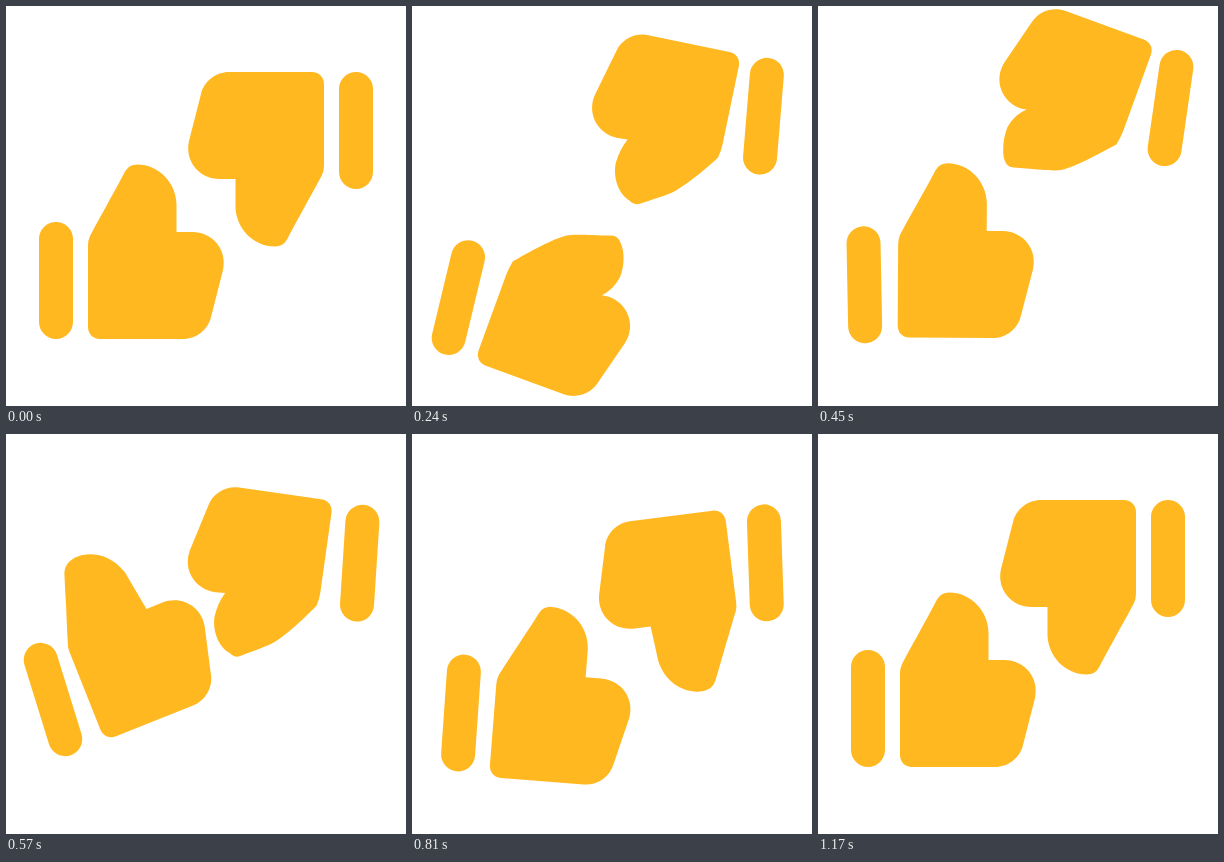
Animation, 400 px wide and 400 px high, one loop 3230 ms. Source, as an HTML page with a canvas:

```html
<!DOCTYPE html>
<html lang="en">
<head>
<meta charset="utf-8">
<title>Thumbs up, thumbs down</title>
<style>
html, body { margin: 0; width: 100%; height: 100%; overflow: hidden; background: #fff; }
canvas { display: block; width: 400px; height: 400px; }
</style>
</head>
<body>
<canvas id="stage" width="400" height="400"></canvas>
<script>
const ctx = document.getElementById('stage').getContext('2d');
const LOOP = 3230, STEP = 30;

// Thumb outlines as x, y pairs, measured from the lower left corner of the fist.
const REST = [2,-103, 10,-118, 14,-125, 20,-136, 26,-147, 30,-154, 37,-167.5, 41,-174.5,
  49,-174.5, 71,-174.5, 88,-156, 88.5,-135, 88.5,-121, 88.5,-107];
const DOWN = [1.7,-108, 11,-118, 30,-141, 45,-151, 52,-155, 68,-158.5, 90.7,-165, 98,-167,
  103,-159, 107,-152, 110.5,-140, 110,-129, 108,-115, 98,-106];
const UP = [0.8,-101.6, 5,-114, 9,-126, 13,-137, 17,-149, 21,-161, 24.5,-171, 28,-179.5,
  40,-181.2, 56,-182, 74,-172, 81,-149, 84,-128, 87.5,-107];

// Step, then: hand angle, x, y, thumb bend (-1 up to 1 down), cuff angle, x, y.
const STILL = [0, 82, 333, 0, 0, 50, 274.5];
const LEFT = [
  [0, ...STILL],
  [4, 13, 69, 353, 0.58, 8.9, 47.5, 290],
  [11, 22.3, 60.5, 356.3, 1, 15, 46, 292],
  [19, -21.7, 98.8, 306.7, -1, -17.2, 47, 265.5],
  [23, -10.4, 90, 331, -0.48, -7.5, 48, 280.5],
  [27, 4.5, 77, 343, 0, 4, 49, 279],
  [31, 2, 80.7, 335, 0, 2, 49.7, 275.5],
  [35, ...STILL]
];
const RIGHT = [
  [4, ...STILL],
  [11, 17.8, 65, 359, 0.87, 7.2, 47.8, 295.5],
  [15, 20, 63, 361.5, 1, 8.2, 47.5, 297],
  [19, 8, 72.8, 332.2, 0.6, 3.7, 46.3, 269.8],
  [23, -16.6, 97.3, 306, -1, -6.9, 46, 258.3],
  [31, 2, 78.2, 341.6, 0, 3, 47.8, 282],
  [39, ...STILL]
];

const secant = (keys, i, c) => (keys[i + 1][c] - keys[i][c]) / (keys[i + 1][0] - keys[i][0]);

// Slopes are flat at turning points, so the curve never passes a key.
function slope(keys, i, c) {
  if (i === 0) return secant(keys, 0, c);
  if (i === keys.length - 1) return 0;
  const a = secant(keys, i - 1, c), b = secant(keys, i, c);
  return a * b > 0 ? 2 * a * b / (a + b) : 0;
}

function poseAt(keys, step) {
  const last = keys.length - 1;
  if (step <= keys[0][0] || step >= keys[last][0]) return STILL;
  const i = keys.findIndex(k => k[0] > step) - 1;
  const a = keys[i], b = keys[i + 1];
  const span = b[0] - a[0], u = (step - a[0]) / span, v = 1 - u;
  return STILL.map((_, n) => {
    const c = n + 1;
    return v * v * (1 + 2 * u) * a[c] + u * u * (3 - 2 * u) * b[c]
      + span * u * v * (v * slope(keys, i, c) - u * slope(keys, i + 1, c));
  });
}

function place(angle, x, y, draw) {
  ctx.save();
  ctx.translate(x, y);
  ctx.rotate(angle * Math.PI / 180);
  ctx.beginPath();
  draw();
  ctx.restore();
}

function drawHand([angle, x, y, bend, cuffAngle, cuffX, cuffY]) {
  place(cuffAngle, cuffX, cuffY, () => {
    ctx.moveTo(0, -41.5);
    ctx.lineTo(0, 41.5);
    ctx.stroke();
  });
  place(angle, x, y, () => {
    const goal = bend > 0 ? DOWN : UP;
    const p = REST.map((r, i) => r + (goal[i] - r) * Math.abs(bend));
    ctx.moveTo(p[0], p[1]);
    ctx.bezierCurveTo(...p.slice(2, 8));
    ctx.bezierCurveTo(...p.slice(8, 14));
    ctx.quadraticCurveTo(...p.slice(14, 18));
    ctx.bezierCurveTo(...p.slice(18, 24));
    ctx.quadraticCurveTo(...p.slice(24, 28));
    ctx.lineTo(104, -107);
    ctx.bezierCurveTo(125, -107, 139.5, -89, 135, -69);
    ctx.lineTo(123, -22);
    ctx.bezierCurveTo(120, -9, 108, 0, 95, 0);
    ctx.lineTo(12, 0);
    ctx.bezierCurveTo(5, 0, 0, -5, 0, -12);
    ctx.lineTo(0, -93);
    ctx.quadraticCurveTo(0, -99, p[0], p[1]);
    ctx.fill();
  });
}

function render(time) {
  const step = Math.floor(time % LOOP / STEP);
  ctx.setTransform(1, 0, 0, 1, 0, 0);
  ctx.fillStyle = '#fff';
  ctx.fillRect(0, 0, 400, 400);
  ctx.fillStyle = ctx.strokeStyle = '#ffb820';
  ctx.lineWidth = 34;
  ctx.lineCap = 'round';
  drawHand(poseAt(LEFT, step));
  ctx.setTransform(-1, 0, 0, -1, 400, 399); // half turn
  drawHand(poseAt(RIGHT, step));
}

const start = performance.now();
function tick() {
  render(performance.now() - start);
  requestAnimationFrame(tick);
}
tick();
</script>
</body>
</html>
```
